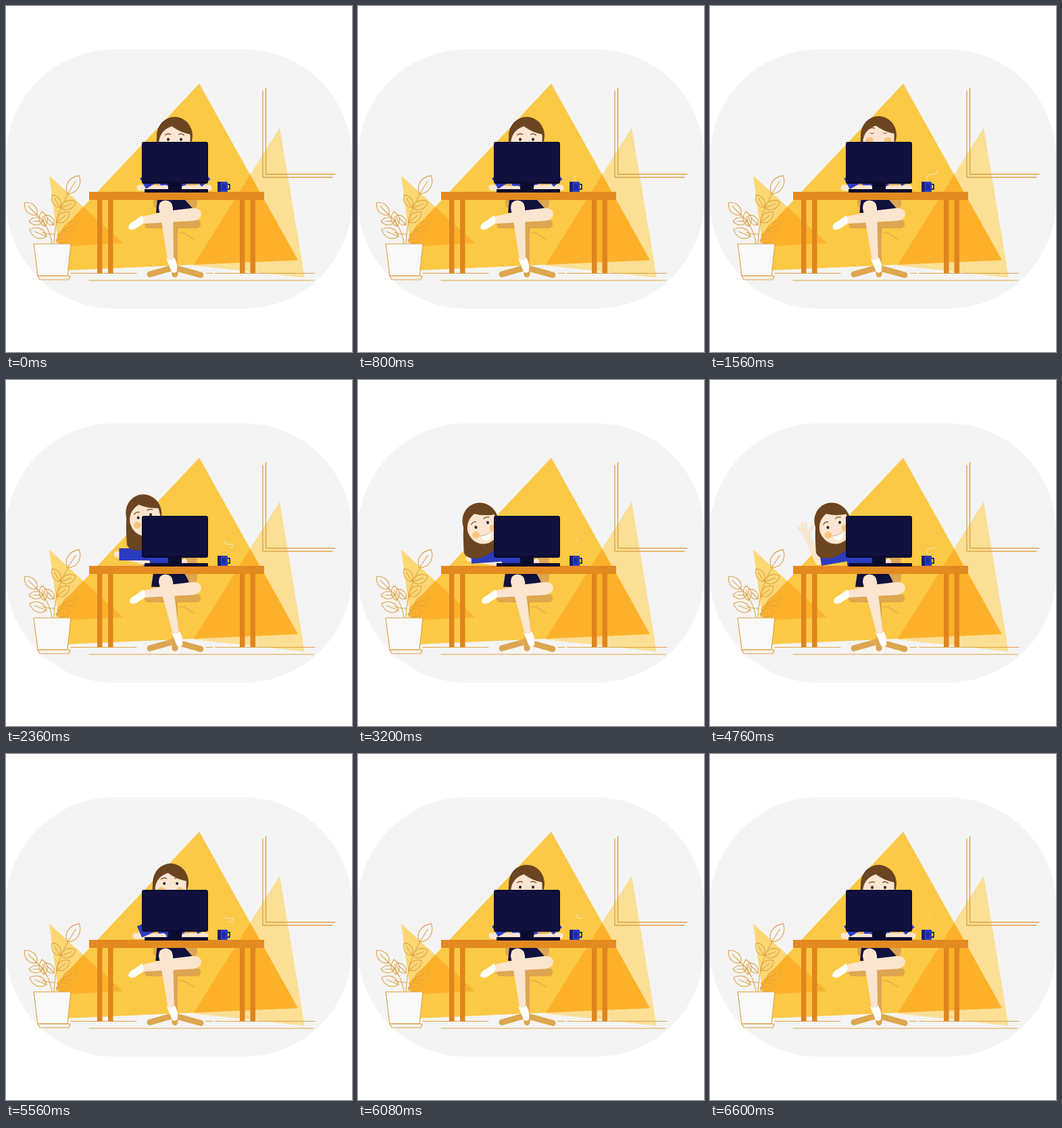
An HTML page with a canvas that plays this animation: 512x512 px, repeating every 6.64 s.

```html
<!DOCTYPE html>
<html>
<head>
<meta charset="utf-8">
<style>
html, body { margin: 0; width: 100%; height: 100%; overflow: hidden; background: #fff; }
canvas { display: block; width: 512px; height: 512px; }
</style>
</head>
<body>
<canvas id="stage" width="512" height="512"></canvas>
<script>
const ctx = document.getElementById('stage').getContext('2d');
const LOOP = 6640;
const SKIN = '#fbe5d0', HAIR = '#6b4420', BLUE = '#2c3cc0', NAVY = '#10113f',
      TAN = '#dda650', WOOD = '#e38a20', LINE = '#e0a347', YELLOW = '#fbc945';

function fill(d, color) { ctx.fillStyle = color; ctx.fill(new Path2D(d)); }

function line(d, color, width, cap = 'round') {
  ctx.strokeStyle = color;
  ctx.lineWidth = width;
  ctx.lineCap = cap;
  ctx.lineJoin = 'round';
  ctx.stroke(new Path2D(d));
}

function rect(x, y, w, h, color, r = 0) {
  ctx.fillStyle = color;
  ctx.beginPath();
  ctx.roundRect(x, y, w, h, r);
  ctx.fill();
}

function oval(x, y, rx, ry, color) {
  ctx.fillStyle = color;
  ctx.beginPath();
  ctx.ellipse(x, y, rx, ry, 0, 0, 7);
  ctx.fill();
}

function placed(x, y, angle, draw) {
  ctx.save();
  ctx.translate(x, y);
  ctx.rotate(angle * Math.PI / 180);
  draw();
  ctx.restore();
}

const clamp = v => Math.max(0, Math.min(1, v));
const smooth = v => v * v * (3 - 2 * v);
const mix = (a, b, k) => a + (b - a) * k;

// time, head x, head y, tilt, face shift, elbow x, y, hand x, y, lean
const SIT = [249.5, 197, 0, 0, 198, 269, 236, 270, 0];
const LOOK = [249.5, 196, 0, -8, 198, 269, 236, 270, 0.1];
const PEEK = [205, 202, -14, -1, 164, 258, 208, 270, 1];
const SMILE = [183, 214, -22, 0, 164, 264, 208, 271, 1];
const WAVE = [183, 214, -23, 0, 160, 269, 143, 229, 1];
const KEYS = [
  [0, SIT], [1250, SIT], [1500, LOOK], [1680, LOOK], [2280, PEEK], [2520, PEEK],
  [3000, SMILE], [3360, SMILE], [3660, WAVE], [4860, WAVE], [5080, SMILE],
  [5500, [243, 195, 0, -4, 191, 269, 232, 270, 0.1]], [5800, LOOK.map((v, i) => i == 3 ? -4 : v)],
  [6150, SIT], [LOOP, SIT]
];

function poseAt(t) {
  const i = KEYS.findIndex(k => k[0] > t);
  const [t0, a] = KEYS[i - 1], [t1, b] = KEYS[i];
  const k = smooth((t - t0) / (t1 - t0));
  return a.map((v, j) => mix(v, b[j], k));
}

function backdrop() {
  ctx.fillStyle = '#fff';
  ctx.fillRect(0, 0, 512, 512);
  rect(0, 64, 512, 384, '#f4f4f4', 160);
  const big = 'M286 115L432 376L92 391L75 339Z';
  const right = 'M405 180L442 402L277 384Z', left = 'M64 251L173 351L78 356Z';
  fill(right, '#fadf95');
  fill(left, '#fbd873');
  fill(big, YELLOW);
  ctx.save();
  ctx.clip(new Path2D(big));
  fill(right, '#fdb12b');
  fill(left, '#fdb12b');
  ctx.restore();
  line('M380 126V253.5H483M384.5 122V249H487', LINE, 1.4);
  line('M96 395.5H193M296 395.5H306M310 395.5H457M123 406H455', LINE, 1);
}

function leaf(x, y, angle, len) {
  placed(x, y, angle, () => {
    const w = len * 0.36;
    line(`M0 0C${len * 0.25} ${-w} ${len * 0.7} ${-w} ${len} 0C${len * 0.7} ${w} ${len * 0.25} ${w} 0 0M0 0H${len * 0.7}`, LINE, 1.1);
  });
}

function plant() {
  line('M71 352C72 325 78 298 93 277M68 352C66 336 58 318 44 308M75 352C78 338 84 332 92 328M72 338C62 338 58 337 54 335', LINE, 1.1);
  leaf(91, 278, -57, 32);
  leaf(46, 309, -136, 26);
  leaf(55, 318, 178, 21);
  leaf(60, 341, -158, 27);
  leaf(57, 326, -100, 22);
  leaf(71, 324, -133, 20);
  leaf(80, 298, -122, 22);
  leaf(81, 299, -22, 24);
  leaf(75, 320, -38, 24);
  leaf(84, 333, -30, 24);
  leaf(74, 347, -14, 22);
  const pot = 'M41 352H96L91 399H47Z', dish = 'M47 399.5H95L93 405H50Z';
  fill(pot, '#f9f9f9');
  line(pot, LINE, 1.2);
  line(dish, LINE, 1.2);
}

function chair() {
  rect(218, 258, 65, 42, TAN, 7);
  rect(246, 326, 8, 64, TAN);
  line('M213 397L248 387L288 398M250 388V397', TAN, 9);
  rect(205, 317, 83, 12, TAN, 5);
  line('M256 336C264 333 270 342 279 345', TAN, 1.2);
}

function legs(k) {
  const dx = 8 * k, s = 2 * k;
  fill(`M${222 - 7 * k} 306L${224 - 6 * k} 286H264L${276 - 5 * k} 299L246 307Z`, NAVY);
  fill(`M242 303L276 299Q289 299 289 308Q288 317 276 318L204 322L${200 + s} 312Z`, SKIN);
  fill(`M${201 + s} 310Q${205 + s} 315 ${203 + s} 322L${191 + s} 330Q${183 + s} 333 ${181 + s} 328Q${181 + s} 322 ${190 + s} 318Z`, '#fff');
  const a = 244 + dx;
  fill(`M226 299Q226 288 236 287.5Q246 288 247 299L${a + 4} 376H${a - 5}L${231 + 2 * k} 325Z`, SKIN);
  fill(`M${a - 7} 374Q${a} 378 ${a + 5} 372Q${a + 11} 383 ${a + 9} 392Q${a + 6} 397 ${a + 1} 393Z`, '#fff');
}

function hand(x, y, angle, open) {
  placed(x, y, angle, () => {
    oval(0, 0, 5 + open, 5 + 2 * open, SKIN);
    if (open < 0.05) return;
    for (const [fx, fy] of [[-10, -12], [-5, -17], [1, -18], [9, -11]])
      line(`M${fx * 0.25} 0L${fx * open} ${fy * open}`, SKIN, 4);
  });
}

function body(p, t) {
  const [hx, hy, tilt, shift, ex, ey, px, py, lean] = p;
  const typing = 1 - clamp(lean * 6);
  const tap = Math.sin(t / 55) * 1.2 * typing;
  rect(mix(228, 203, lean), 246, mix(38, 45, lean), 30, BLUE, 3);

  const re = mix(300, 264, clamp(lean * 1.4)), rs = mix(286, 262, lean);
  line(`M${re} 269L264 ${270 - tap}`, SKIN, 9);
  line(`M${rs} 250L${re - 4} 262`, BLUE, 17, 'butt');

  const raise = clamp((260 - py) / 30);
  const swing = raise * 9 * Math.sin((t - 4760) / 95);
  const wx = px + swing, wy = py + Math.abs(swing) * 0.12 + tap;
  const sx = mix(222, 234, lean), sy = mix(251, 258, lean) - 4 * raise;
  line(`M${ex} ${ey}L${wx} ${wy}`, SKIN, 9);
  hand(wx, wy, swing * 1.6 - 8, raise);
  line(`M${sx} ${sy}L${mix(sx, ex, mix(0.8, 0.95, lean))} ${mix(sy, ey, mix(0.65, 0.8, lean))}`, BLUE, 18, 'butt');
}

function head(p, t) {
  const [hx, hy, tilt, shift, , , , , lean] = p;
  placed(hx, hy, 0, () =>
    fill('M-26 -8C-28 10 -27 30 -26 42Q-22 51 -8 50Q8 49 22 34L24 -6Z', HAIR));
  placed(hx, hy, tilt, () => {
    oval(0, -5, 26.5, 28, HAIR);
    const smile = smooth(clamp((t - 2550) / 300)) * (1 - clamp((t - 5100) / 200));
    const cover = new Path2D('M-23 2Q-20 -14 -4 -19Q8 -10 23 -7V8C22 20 12 29 0 29S-22 20 -23 6Z');
    ctx.save();
    ctx.fillStyle = SKIN;
    ctx.fill(cover);
    ctx.clip(cover);
    ctx.translate(0, shift);
    oval(-13.5, 11, 5.5, 5, '#f8c37f');
    oval(13.5, 11, 5.5, 5, '#f8c37f');
    line('M-14 -6Q-10 -9 -6 -7M6 -7Q10 -9 14 -6', HAIR, 1.2);
    if (t > 1480 && t < 1640) line('M-12 0Q-9.500 2 -7 0M7 0Q9.500 2 12 0', '#6b4f40', 1);
    else for (const x of [-9.5, 9.5]) oval(x, 0.500, 2, 2.2, '#2b2630');
    if (smile > 0.02) {
      fill(`M-8 15Q0 18 8 15Q6 ${15 + 10 * smile} 0 ${15 + 10 * smile}Q-6 ${15 + 10 * smile} -8 15Z`, '#fff');
      line('M-8 15Q0 18 8 15', '#d99a78', 0.8);
    } else line('M-4 18Q0 20 4 18', '#c98a68', 1);
    ctx.restore();
  });
}

function desk() {
  for (const x of [135, 151, 346, 361.5]) rect(x, 286, 7.5, 109.5, '#e1841d');
  rect(123, 275, 259, 12, WOOD);
}

function computer() {
  rect(240, 260, 20, 13, '#0a0b2c');
  rect(205, 271, 94, 5, '#0a0b2c', 1);
  rect(201, 201, 98, 62, '#0a0b2f', 3);
  rect(203, 203, 94, 57, NAVY, 1);
}

function mug(t) {
  line('M327 264H331V271H327', '#1c2380', 1.8);
  rect(313, 260, 15, 15, BLUE, 1);
  rect(313, 260, 5, 15, '#1a2080', 1);
  rect(320, 263, 5, 9, '#1f2a98');
  const k = t % (LOOP / 2) / (LOOP / 2), len = 40;
  const front = len * clamp((k - 0.12) / 0.6), tail = len * clamp((k - 0.48) / 0.54);
  if (front <= tail) return;
  ctx.save();
  ctx.setLineDash([0, tail, front - tail, 200]);
  line('M321 257C319 249 325 250 330 249C337 248 338 243 331 243C324 244 322 240 326 236', '#f6dfae', 1.3, 'butt');
  ctx.restore();
}

function frame(now) {
  const t = Math.floor(now % LOOP / 40) * 40;
  const pose = poseAt(t);
  backdrop();
  plant();
  chair();
  legs(pose[8]);
  desk();
  body(pose, t);
  head(pose, t);
  computer();
  mug(t);
  requestAnimationFrame(frame);
}

const start = performance.now();
frame(0);
function tick() { return performance.now() - start; }
</script>
</body>
</html>
```
